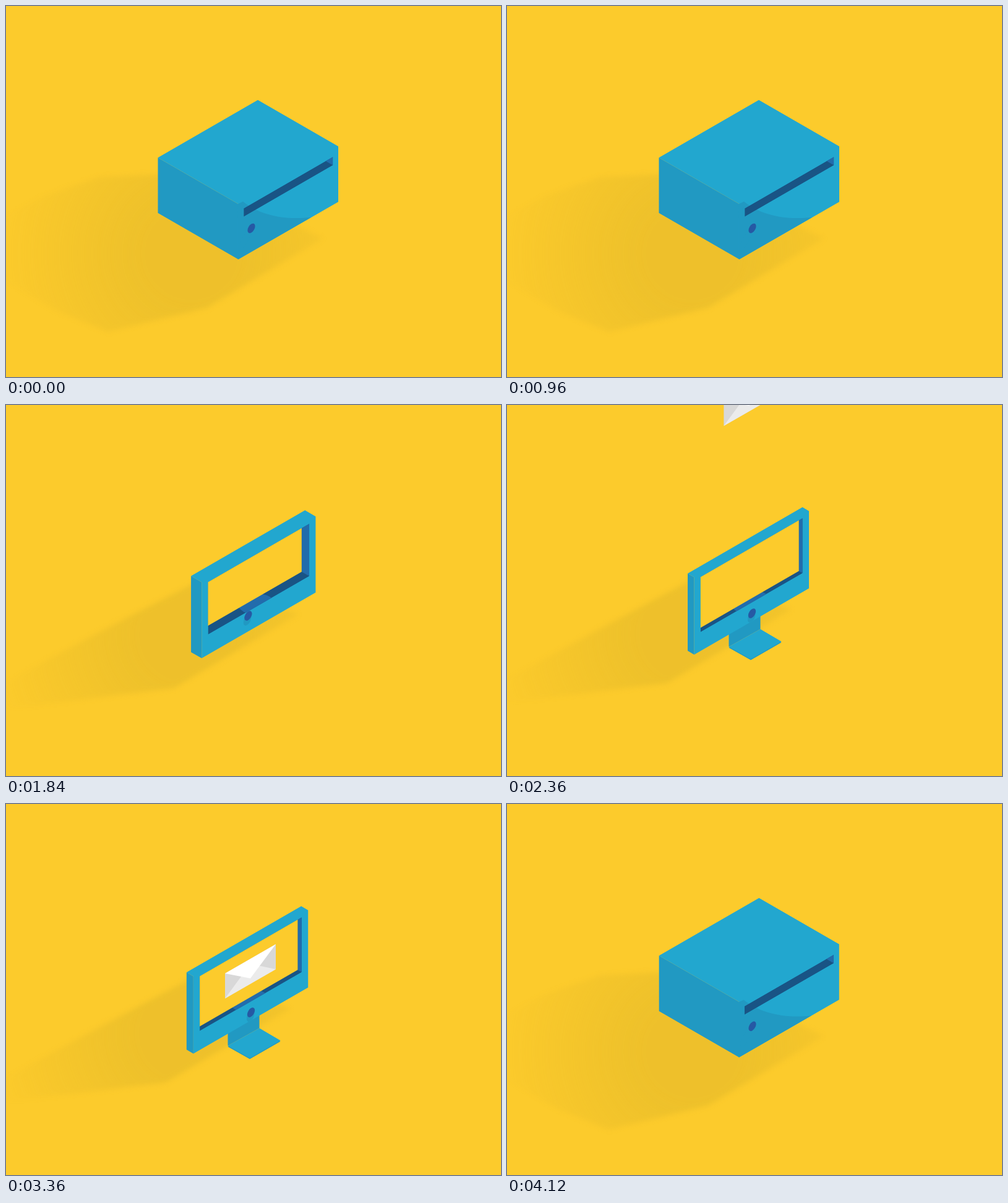
Animation, 800 px wide and 600 px high, one loop 4.16 s. Source, as an HTML page with a canvas:

```html
<!DOCTYPE html>
<html lang="en">
<head>
<meta charset="utf-8">
<title>Mail machine</title>
<style>
  html, body { margin: 0; width: 100%; height: 100%; overflow: hidden; background: #fccb2c; }
  canvas { display: block; }
</style>
</head>
<body>
<canvas id="stage" width="800" height="600"></canvas>
<script>
const ctx = document.getElementById('stage').getContext('2d');
const LOOP = 4160, STEP = 40, K = 0.577; // K: isometric slope
const YELLOW = '#fccb2c', LIGHT = '#22a7cf', SIDE = '#2199c2',
      FLOOR = '#195485', WALL = '#226cac', BUTTON = '#2659a4';

const clamp = v => Math.max(0, Math.min(1, v));
const span = (t, from, to) => clamp((t - from) / (to - from));
const lerp = (a, b, p) => a + (b - a) * p;
const sineOut = v => Math.sin(v * Math.PI / 2);
const quadOut = v => 1 - (1 - v) ** 2;
const quadInOut = v => v < 0.5 ? 2 * v * v : 1 - 2 * (1 - v) ** 2;

function trace(points) {
  ctx.beginPath();
  points.forEach(([x, y]) => ctx.lineTo(x, y));
  ctx.closePath();
}
function poly(color, points) {
  trace(points);
  ctx.fillStyle = color;
  ctx.fill();
}
function clipped(points, draw) {
  ctx.save();
  trace(points);
  ctx.clip();
  draw();
  ctx.restore();
}

function drawShadow(p, dx, dy) {
  const outline = [
    [250, 272, 300, 282], [150, 277, 150, 362], [60, 308, 60, 411], [-10, 345, -10, 450],
    [-40, 400, -60, 470], [0, 445, -40, 482], [80, 492, -25, 483], [165, 527, -10, 482],
    [325, 488, 258, 450], [512, 376, 460, 330], [400, 320, 400, 310]
  ].map(([x0, y0, x1, y1]) => [lerp(x0, x1, p) + dx, lerp(y0, y1, p) + dy]);
  const cx = lerp(300, 290, p), cy = lerp(400, 370, p);
  const fade = ctx.createRadialGradient(cx, cy, 75, cx, cy, 315);
  fade.addColorStop(0, 'rgba(200,165,40,.27)');
  fade.addColorStop(1, 'rgba(200,165,40,0)');
  ctx.save();
  ctx.filter = 'blur(4px)';
  poly(fade, outline);
  ctx.restore();
}

function drawStand(q) {
  if (!q) return;
  const drop = 19.5 * Math.min(1, 2 * q), out = Math.max(0, 2 * q - 1);
  const left = [358.5, 371.5 + drop], right = [409.5, 343 + drop];
  const dx = 35.5 * out, dy = 20 * out;
  poly(SIDE, [[358.5, 360], [409.5, 331], right, left]);
  if (!out) return;
  const plate = [left, right, [right[0] + dx - 1.5, right[1] + dy], [left[0] + dx, left[1] + dy]];
  poly(SIDE, plate.map(([x, y]) => [x, y + 1.5]));
  poly(LIGHT, plate);
}

function drawButton(p, bump, front) {
  const x = lerp(396.5, 396, p) - 7.4 * bump, y = lerp(359.5, 337, p) + 4.2 * bump;
  const inFacePlane = draw => {
    ctx.save();
    ctx.transform(0.87, -0.5, 0, 1, x, y);
    ctx.beginPath();
    draw();
    ctx.restore();
  };
  clipped(front, () => inFacePlane(() => {
    const sx = (-1 - 13 * (1 - p)) / 0.87, sy = 7 + 18 * (1 - p) + 0.5 * sx;
    ctx.lineWidth = 14;
    ctx.lineCap = 'round';
    ctx.strokeStyle = SIDE;
    ctx.moveTo(0, 0);
    ctx.lineTo(sx, sy);
    ctx.stroke();
  }));
  inFacePlane(() => {
    ctx.arc(0, 0, 7, 0, 7);
    ctx.fillStyle = BUTTON;
    ctx.fill();
  });
}

// p: 0 is the closed box, 1 is the monitor; bump pushes it forward along its depth.
function drawBox(p, bump) {
  const w = lerp(161.5, 185.5, p), d = lerp(130, 10.5, p), h = lerp(89.7, 125.2, p);
  const fx = lerp(391.25, 390, p) + 15.5 * bump + (d - w) / 2;
  const fy = lerp(325.75, 347.1, p) + 9 * bump + (d + w) * K / 2;
  // u runs along the front, v up, z towards the back
  const at = (u, v, z = 0) => [fx + u - z, fy - v - (u + z) * K];

  const front = [at(0, 0), at(w, 0), at(w, h), at(0, h)];
  const outline = [at(0, 0), at(w, 0), at(w, h), at(w, h, d), at(0, h, d), at(0, 0, d)];
  poly(SIDE, [at(0, 0), at(0, h), at(0, h, d), at(0, 0, d)]);
  poly(LIGHT, [at(0, 0), at(w, 0), at(w, h), at(w, h, d), at(0, h, d), at(0, h)]);

  const shade = 1 - p / 0.62;
  if (shade > 0) clipped(outline, () => {
    const top = h * shade;
    const place = (dx, dy) => [fx + dx * shade, fy - top + dy * shade];
    ctx.beginPath();
    ctx.moveTo(fx - 1, fy);
    ctx.lineTo(fx - 1, fy - top);
    ctx.lineTo(...place(7.5, -4));
    ctx.bezierCurveTo(...place(24.5, 10), ...place(59.5, 28), ...at(118 * shade, 0));
    ctx.lineTo(fx, fy);
    ctx.fillStyle = SIDE;
    ctx.fill();
  });

  drawButton(p, bump, front);

  const inset = lerp(8.7, 10.3, p), right = w - inset, inner = lerp(120, 6, p);
  const high = h - lerp(12, 5.7, p), low = high - lerp(13.5, 89, p);
  const opening = z => [at(inset, low, z), at(right, low, z), at(right, high, z), at(inset, high, z)];
  clipped(opening(0), () => {
    poly(FLOOR, opening(0));
    const r = 72 * (p - 0.53);
    if (r > 0) {
      ctx.beginPath();
      ctx.ellipse(...at(w / 2, low, 0.29 * inner), r, r * K, 0, 0, 7);
      ctx.fillStyle = WALL;
      ctx.fill();
    }
    poly(WALL, [at(right, low), at(right, high), at(right, high, inner), at(right, low, inner)]);
    if (p > 0.5) poly(YELLOW, opening(inner));
  });
}

// Envelope spanned by its top edge (ex, ey) and its side (sx, sy).
function drawEnvelope(x, y, ex, ey, sx, sy) {
  const at = (u, v) => [x + ex * u + sx * v, y + ey * u + sy * v];
  poly('#d8d8d8', [at(0, 0), at(1, 0), at(1, 1), at(0, 1)]);
  poly('#ebebeb', [at(0, 1), at(1, 1), at(0.5, 0.2)]);
  poly('#ffffff', [at(0, 0), at(1, 0), at(0.5, 0.78)]);
}

function drawMail(t) {
  if (t >= 160 && t < 1000) {
    const s = t - 140, x = 800 - 0.591 * s + 0.000068 * s * s;
    const slotTop = u => 327 - (u - 384) * K;
    clipped([[300, slotTop(300)], [900, slotTop(900)], [900, 600], [300, 600]], () =>
      drawEnvelope(x, 373 + (x - 521.5) * K, 80.5, -47.3, 35.7, 20.3));
  } else if (t >= 2360 && t < 3960) {
    const fall = span(t, 2320, 2800);
    const away = 446 * quadInOut(span(t, 3360, 3940) ** 0.67); // quick start, long slow end
    const x = 354 - 14 * Math.sin(Math.PI * fall) + away;
    const y = 274 - 334 * (1 - quadOut(fall)) + away * K;
    drawEnvelope(x, y, 82, -47.2, 0, 40.5);
  }
}

function draw(t) {
  const opening = span(t, 1400, 1960);
  const p = sineOut(opening) - quadInOut(span(t, 3320, LOOP));
  const bump = Math.sin(Math.PI * opening);
  ctx.fillStyle = YELLOW;
  ctx.fillRect(0, 0, 800, 600);
  drawShadow(p, 15.5 * bump, 9 * bump);
  drawStand(span(t, 1960, 2120) - span(t, 3360, 3480));
  drawBox(p, bump);
  drawMail(t);
}

const start = performance.now();
function tick() {
  const t = (performance.now() - start) % LOOP;
  draw(Math.floor(t / STEP) * STEP);
  requestAnimationFrame(tick);
}
tick();
</script>
</body>
</html>
```
